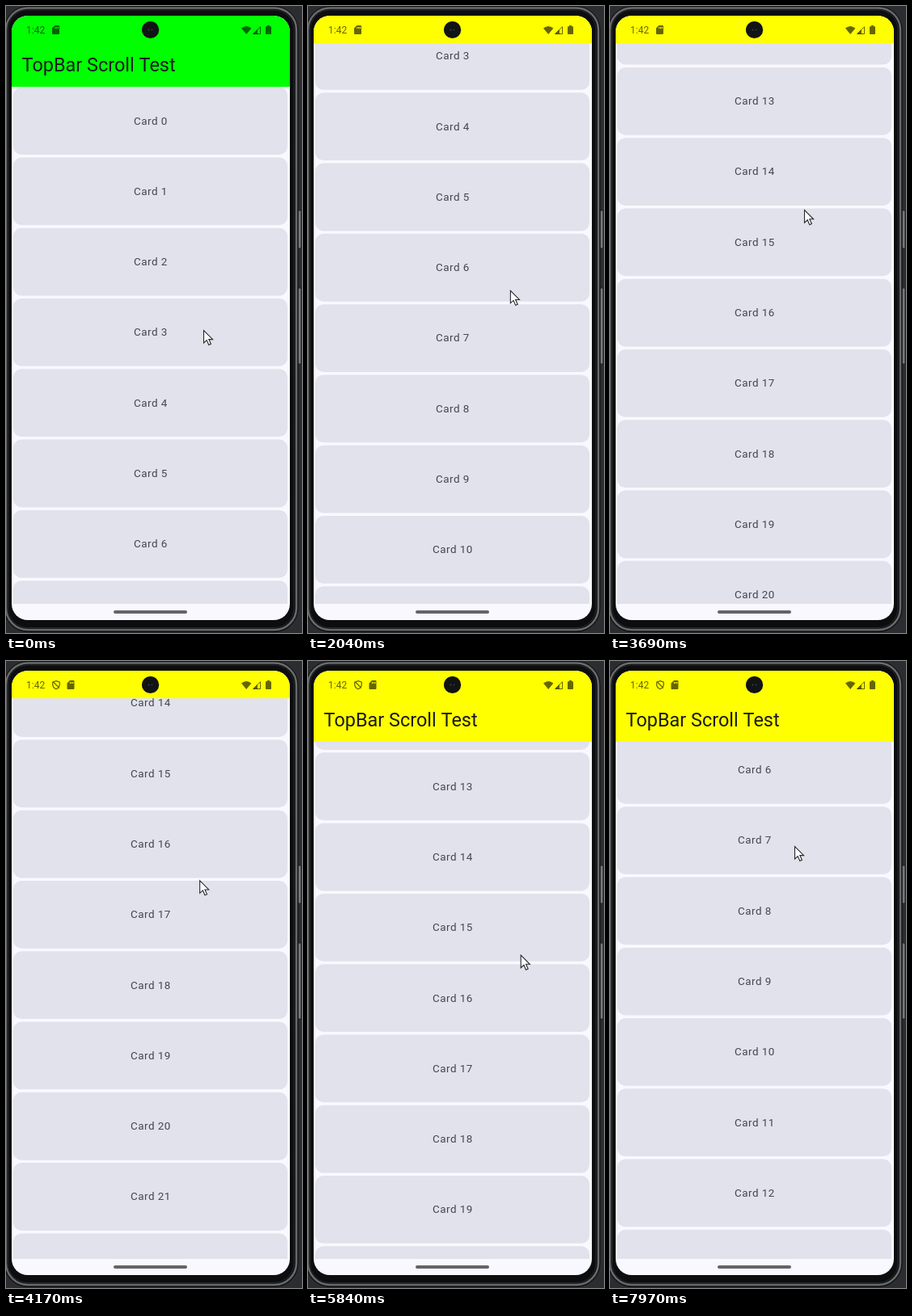
An HTML page with a canvas that plays this animation: 366x776 px, repeating every 8 s.

```html
<!DOCTYPE html>
<html lang="en">
<head>
<meta charset="utf-8">
<title>Collapsing top bar</title>
<style>
html, body { margin: 0; width: 100%; height: 100%; overflow: hidden; background: #2b2d30; }
canvas { display: block; width: 366px; height: 776px; }
</style>
</head>
<body>
<canvas id="stage"></canvas>
<script>
const W = 366, H = 776, LOOP = 8000;
const LEFT = 7, TOP = 12, WIDTH = 344, HEIGHT = 748;
const STATUS = 46.1, BAR = 100, LIST_END = 740;
const PITCH = 87.28, CARD_H = 83.8;
const INK = 'rgba(0,0,0,.6)';

const canvas = document.getElementById('stage');
const dpr = window.devicePixelRatio || 1;
canvas.width = W * dpr;
canvas.height = H * dpr;
const ctx = canvas.getContext('2d');

// Each swipe moves the list by a distance, then glides to rest
const swipes = [
  { start: 1420, end: 2820, by: 526 },
  { start: 2990, end: 4240, by: 786.4 },
  { start: 5190, end: 6900, by: -345.8 },
  { start: 7040, end: 7980, by: -435.6 }
];

// Pointer stops; a drag runs from its stop to the next one
const stops = [
  { t: 380, x: 244, y: 401 },
  { t: 1220, x: 227, y: 488, drag: true },
  { t: 1800, x: 248, y: 335 },
  { t: 2900, x: 263, y: 472, drag: true },
  { t: 3650, x: 240, y: 252 },
  { t: 4800, x: 238, y: 297, drag: true },
  { t: 5420, x: 269, y: 384 },
  { t: 7000, x: 233, y: 268, drag: true },
  { t: 7350, x: 246, y: 400 },
  { t: 7970, x: 228, y: 229 }
];

const ramp = (t, a, b) => Math.min(1, Math.max(0, (t - a) / (b - a)));
const smooth = u => u * u * (3 - 2 * u);
const glide = u => 1 - (1 - u ** 1.5) ** 3;
const mix = (a, b, u) => a + (b - a) * u;

const travel = (list, t) =>
  list.reduce((sum, s) => sum + s.by * glide(ramp(t, s.start, s.end)), 0);

// The bar hides with the first swipe up and returns with the first swipe down
function barBottom(t) {
  const up = travel(swipes.slice(0, 2), t);
  const down = -travel(swipes.slice(2), t);
  return Math.min(BAR, Math.max(STATUS, BAR - up) + down);
}

function pointerAt(t) {
  const i = stops.findLastIndex(s => t >= s.t);
  const a = stops[Math.max(0, i)], b = stops[Math.min(i + 1, stops.length - 1)];
  const u = a === b ? 0 : smooth(ramp(t, a.t, b.t));
  return { x: mix(a.x, b.x, u), y: mix(a.y, b.y, u), drag: a.drag };
}

function box(x, y, w, h, r, fill, stroke, width = 1) {
  ctx.beginPath();
  ctx.roundRect(x, y, w, h, r);
  ctx.fillStyle = fill;
  ctx.fill();
  if (!stroke) return;
  ctx.strokeStyle = stroke;
  ctx.lineWidth = width;
  ctx.stroke();
}

function disc(x, y, r, fill) {
  ctx.beginPath();
  ctx.arc(x, y, r, 0, 7);
  ctx.fillStyle = fill;
  ctx.fill();
}

function shape(d, x, y, fill, stroke, width = 1) {
  const path = new Path2D(d);
  ctx.save();
  ctx.translate(x, y);
  if (fill) { ctx.fillStyle = fill; ctx.fill(path, 'evenodd'); }
  if (stroke) { ctx.strokeStyle = stroke; ctx.lineWidth = width; ctx.stroke(path); }
  ctx.restore();
}

function label(text, x, y, size, fill, align = 'left', spacing = 0) {
  ctx.font = `${size}px Roboto, sans-serif`;
  ctx.letterSpacing = spacing + 'px';
  ctx.textAlign = align;
  ctx.fillStyle = fill;
  ctx.fillText(text, x, y);
}

function clipped(x, y, w, h, r, draw) {
  ctx.save();
  ctx.beginPath();
  ctx.roundRect(x, y, w, h, r);
  ctx.clip();
  draw();
  ctx.restore();
}

function drawPhone() {
  ctx.fillStyle = '#2b2d30';
  ctx.fillRect(0, 0, W, H);
  box(361, 253, 4, 47, 1.5, '#77797b', '#1c1d1e');
  box(361, 349, 4, 94, 1.5, '#77797b', '#1c1d1e');
  box(-2, 0.5, 363, 774, 29, '#1a1b1c', '#111');
  box(0, 2.5, 359, 769.5, 27, '#08090a', '#686a6c', 2.5);
  box(2.5, 5, 353.5, 764.5, 24, '#0c0d0e', '#2a2b2c');
}

function drawRipple(t, cardY) {
  const alpha = 0.065 * ramp(t, 4800, 4950) * (1 - ramp(t, 5190, 5400));
  if (!alpha) return;
  const y = cardY + 26, r = mix(14, 46, ramp(t, 4800, 5140));
  const glow = ctx.createRadialGradient(238, y, r * 0.45, 238, y, r);
  glow.addColorStop(0, `rgba(20,20,25,${alpha})`);
  glow.addColorStop(1, 'rgba(20,20,25,0)');
  clipped(9, cardY, 339, CARD_H, 10, () => {
    ctx.fillStyle = glow;
    ctx.fillRect(180, cardY, 120, CARD_H);
  });
}

function drawCards(t, top) {
  const scroll = travel(swipes, t);
  const first = Math.max(0, Math.floor((scroll - 60) / PITCH));
  clipped(LEFT, top, WIDTH, LIST_END - top, 0, () => {
    for (let n = first; n < first + 10; n++) {
      const y = BAR + 0.2 + n * PITCH - scroll;
      box(9, y, 339, CARD_H, 10, '#e1e2ec');
      if (n === 17) drawRipple(t, y);
      label('Card ' + n, 178.9, y + 46.3, 13.4, '#44464f', 'center', 0.5);
    }
  });
}

function drawStatus(t) {
  const shield = t >= 3970;
  label('1:42', 25, 34, 12, INK);
  if (shield) {
    shape('M5 .6L9.3 2.2V5.4Q9 9 5 10.8Q1 9 .7 5.4V2.2ZM1 1.5L9 9.5', 57, 24, null, INK, 1.2);
  }
  shape('M3.5 0H8Q9 0 9 1V10Q9 11 8 11H1Q0 11 0 10V3.5Z'
    + 'M3.4 2H4.4V4H3.4ZM5.2 2H6.2V4H5.2ZM7 2H8V4H7Z', shield ? 75.5 : 57, 24, INK);
  shape('M0 3Q6.2-2 12.4 3L6.2 10.5Z', 291, 24.5, INK);
  shape('M.6 9.5H9.5V.8Z', 305, 25, null, INK);
  shape('M.6 9.5H6V4.2Z', 305, 25, INK);
  shape('M2 0H5V1.2H6.2Q7 1.2 7 2V10.2Q7 11 6.2 11H.8Q0 11 0 10.2V2Q0 1.2.8 1.2H2Z', 321, 24, INK);
  disc(178.6, 29.5, 10.6, '#111315');
  disc(176.5, 29.5, 1, '#3a4238');
  disc(180.5, 29.5, 1, '#333c32');
}

function drawBar(t, bottom) {
  ctx.fillStyle = `rgb(${Math.round(255 * ramp(t, 1600, 1880))},255,0)`;
  ctx.fillRect(LEFT, TOP, WIDTH, bottom - TOP);
  clipped(LEFT, STATUS, WIDTH, bottom - STATUS, 0, () =>
    label('TopBar Scroll Test', 19.6, 81 - (BAR - bottom) / 2, 23.45, '#1a1b21'));
  drawStatus(t);
}

function drawPointer(t) {
  const { x, y, drag } = pointerAt(t);
  if (drag) disc(x, y, 12, 'rgba(245,242,80,.78)');
  shape('M.5.5V16L4.2 12.6L6.8 18.5L9.4 17.3L6.8 11.6H11.6Z', x, y, '#fff', '#26282c', 1.1);
}

function draw(t) {
  const bottom = barBottom(t);
  ctx.setTransform(dpr, 0, 0, dpr, 0, 0);
  drawPhone();
  clipped(LEFT, TOP, WIDTH, HEIGHT, 20, () => {
    ctx.fillStyle = '#faf8ff';
    ctx.fillRect(LEFT, TOP, WIDTH, HEIGHT);
    drawCards(t, bottom);
    drawBar(t, bottom);
    box(133, 748, 91, 4, 2, '#646368');
  });
  drawPointer(t);
}

const start = performance.now();
function tick() {
  draw((performance.now() - start) % LOOP);
  requestAnimationFrame(tick);
}
tick();
</script>
</body>
</html>
```
